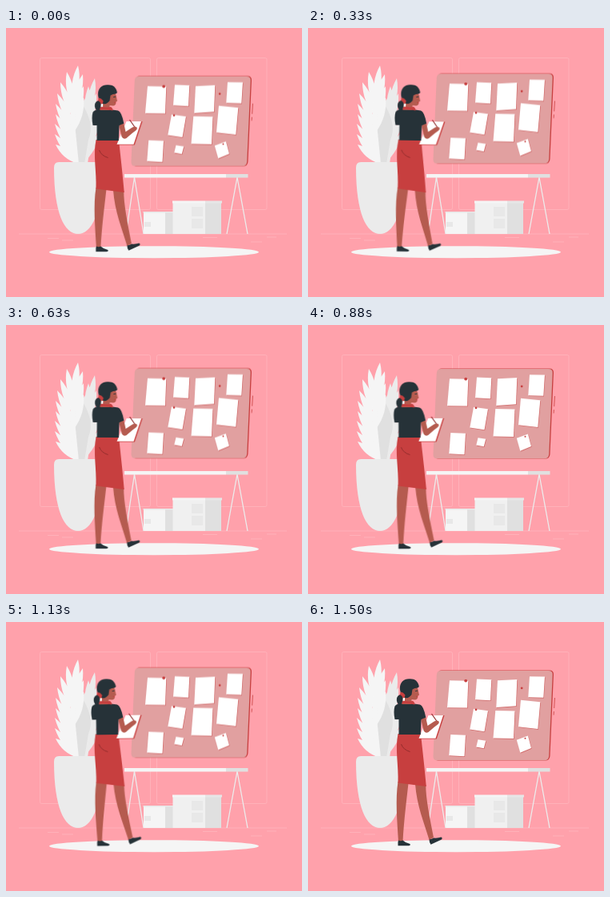
An HTML page that plays this animation: 370x337 px, repeating every 1540 ms.

```html
<!DOCTYPE html>
<html lang="en">
<head>
<meta charset="utf-8">
<title>Planning board</title>
<style>
  html, body { margin: 0; width: 100%; height: 100%; overflow: hidden; background: #ffa1ab; }
  svg { display: block; width: 370px; height: 337px; }
  .board { animation: float 1540ms linear -40ms infinite; }
  .person { transform-origin: 138.5px 176px; animation: sway 1540ms linear -40ms infinite; }
  @keyframes float { 50% { transform: translateY(-7.4px); } }
  @keyframes sway {
    0%, 100% { transform: rotate(0deg); }
    25% { transform: rotate(.9deg); }
    75% { transform: rotate(-.9deg); }
  }
  .line { fill: none; stroke: #ffb5bd; stroke-width: .8; }
  .red { fill: #c73f3f; }
  .ink { fill: #263238; }
  .skin { fill: #b55b4f; }
  .pale { fill: #f5f5f5; }
  .grey { fill: #e0e0e0; }
</style>
</head>
<body>
<svg viewBox="0 0 370 337">
  <g class="line">
    <rect x="42.500" y="37.500" width="138" height="190" rx="2"/>
    <rect x="188.500" y="37.500" width="137.500" height="190" rx="2"/>
    <path d="M16 258H351M52 263.500H66M70 266H84M246 262.500H264M306 268H320M326 262H338"/>
  </g>

  <ellipse class="pale" cx="185" cy="280.700" rx="131" ry="7.500"/>

  <g id="plant"></g>
  <path fill="#ebebeb" d="M66 168H114Q120.500 168 120.500 175C120 232 107 258 90 258S60 232 60 175Q60 168 66 168Z"/>

  <g class="storage">
    <path class="pale" d="M172 230H199V258H172Z"/>
    <path class="grey" d="M199 230H209V258H199Z"/>
    <path fill="#e8e8e8" d="M171.500 230H209V231.500H171.500ZM173 243H181V249H173Z"/>
    <path fill="#f0f0f0" d="M208.500 217H249V258H208.500Z"/>
    <path class="grey" d="M249 217H269V258H249Z"/>
    <path fill="#e8e8e8" d="M232 224H246V236H232ZM232 239H246V251H232Z"/>
    <path class="pale" d="M208 216.500H249V219.500H208Z"/>
    <path fill="#e6e6e6" d="M249 216.500H270V219.500H249Z"/>
  </g>
  <path d="M160.500 187L150 258M160.500 187L172 258M289 187L276 258M289 187L302 258" fill="none" stroke="#ececec" stroke-width="1.300"/>
  <path class="pale" d="M148 183H275V187.500H148Z"/>
  <path class="grey" d="M275 183H302.500V187.500H275Z"/>

  <g class="board">
    <path class="red" d="M167 60.500H302Q307.300 60.500 307 66L302.500 168Q302 173.500 296.500 173.500H163Q158 173.500 158.200 168L162 66Q162.300 60.500 167 60.500Z"/>
    <path fill="#e1a0a0" d="M166 60.900H300.500Q306 60.900 305.700 66L301.200 168Q300.800 173.300 295.500 173.300H161Q156.300 173.300 156.500 168L160.800 66Q161.200 60.900 166 60.900Z"/>
    <path d="M308.500 95L307.700 108M307.400 112L307.100 116.500" fill="none" stroke="#c73f3f" stroke-width=".8"/>
    <g id="papers"></g>
    <g class="red">
      <circle cx="197.200" cy="73.600" r="1.900"/>
      <circle cx="267.200" cy="82.800" r="1.400"/>
      <circle cx="210" cy="109.800" r="1.400"/>
      <circle cx="271.500" cy="145.800" r="1"/>
    </g>
  </g>

  <g class="person">
    <g class="skin">
      <path d="M134 203L147.300 204C147 220 152 244 157 270L151.500 273C145 251 136 230 134 203Z"/>
      <path d="M112.500 200L125.500 202C123 225 120 248 118.500 275H113C111.500 250 109 222 112.500 200Z"/>
    </g>
    <g class="ink">
      <path d="M113 273.500Q116 275 118.500 273.500Q122 277 127.500 278Q128.500 280 126 280.300H112.500Q112 276 113 273.500Z"/>
      <path d="M151.500 272.500Q155 272 157 270.500Q162 271 166.500 269.500Q168.500 270.500 167 272.500L153.500 278.700Q151.500 276 151.500 272.500Z"/>
    </g>
    <path class="red" d="M112.500 140H141C143 160 146 184 147.800 206L112.500 201.500C113.500 180 108.500 160 112.500 140Z"/>
    <path d="M116.500 153Q119 160 127.500 162.500" fill="none" stroke="#8f2b2b" stroke-width=".9"/>

    <path class="red" d="M151.500 117H170.500L160.800 146.500H139.500Z"/>
    <path fill="#fff" d="M150.500 117H169L159.500 145.800H138.500Z"/>
    <path d="M154.500 115L161.500 125" stroke="#8f2b2b" stroke-width="1.200"/>

    <path class="skin" d="M140.500 119L147 118.500L149.500 130L157 125Q160 122.500 163 124Q165 126 162 128.500L158 131.500L150.500 138Q146.500 140 144.500 136Z"/>
    <path class="ink" d="M115 102.500Q124 100 133 102.500L140 103.500Q144.500 105 147.300 119.500L141.500 122L140.800 141H113.500L113.500 122H108.500Q106.500 112 108.500 105.500Q110.500 102.500 115 102.500Z"/>
    <path class="skin" d="M119 86L131 80Q137.500 80 138 87L139 91.500L137.300 92.500Q137.500 97 134 97.500L129.500 97V103H117.500Z"/>
    <path class="red" d="M116 102.500Q118 98.500 121 98.500Q126 100.500 131 98.800Q133.500 100.500 133.500 103.500Q124 101 116 102.500Z"/>
    <path fill="#fff" d="M118.500 95H121V98.800H118.200Z"/>
    <path class="ink" d="M115.200 86C113.500 77 119 71.300 126 71.300C133 70.500 137.500 74 138.700 80Q139 82 137 82.500Q133 82.500 130.500 84.500L129.500 91Q126 96 121.500 95Q116 92 115.200 86Z"/>
    <path class="ink" d="M117.500 90.500Q110.500 91 110.800 98Q111.500 103.500 115.500 104.500Q118.500 101 118.500 95Z"/>
    <path class="red" d="M115.500 88Q118.500 87 121.500 91.500Q121.500 94.500 119 95.500Q117.500 92 115 91Z"/>
    <path class="ink" d="M134 86.300L137 85.600V86.500L134 87.100Z"/>
    <path class="red" d="M134.800 93.300L137.500 92.500L136.800 94.200Z"/>
  </g>
</svg>

<script>
  const add = (id, d, fill) => {
    const p = document.createElementNS('http://www.w3.org/2000/svg', 'path');
    p.setAttribute('d', d);
    p.setAttribute('fill', fill);
    document.getElementById(id).append(p);
  };

  // Pointed leaflet from the stem at (bx, by) to its tip
  const blade = (bx, by, x, y, w) => {
    const mx = (bx + x) / 2, my = (by + y) / 2;
    const len = Math.hypot(x - bx, y - by);
    const nx = (y - by) / len * w, ny = (bx - x) / len * w;
    return `M${bx} ${by}Q${mx + nx} ${my + ny} ${x} ${y}Q${mx - nx} ${my - ny} ${bx} ${by}Z`;
  };

  const frond = (tips, stemX, drop, w, fill) => {
    const d = tips.map(([x, y]) => {
      const by = Math.min(y + drop, 170);
      return blade(stemX(by), by, x, y, w);
    });
    add('plant', d.join(''), fill);
  };

  const leftStem = y => 84 + 6 * ((y - 100) / 70) ** 2;
  const rightStem = y => 104 - (y - 100) * .12;

  frond([[111, 63], [103, 73], [98, 88], [96, 103], [113, 82], [116, 98], [118, 114], [118, 130]],
    rightStem, 44, 8, '#ebebeb');
  add('plant', 'M104 92C111 115 106 145 102 170H90C94 145 96 115 104 92Z', '#ebebeb');
  add('plant', 'M97 98C107 116 108 128 103 140L98 170H86L80 136C82 122 91 118 97 98Z', '#e0e0e0');
  frond([[90, 47], [76, 55], [68, 68], [64, 82], [62, 95], [62, 108], [61, 120], [61, 133], [62, 146],
    [96, 58], [97, 73], [97, 87]], leftStem, 43, 8.5, '#f5f5f5');
  add('plant', 'M88 62C91 80 85 105 87 130L91 170H86C80 145 76 105 88 62Z', '#f5f5f5');

  const papers = [
    'M177 73.300L200.300 73.800L199 107.500L174 107.300Z',
    'M211 71.500L229.300 72.300L228 98.300L209 97.300Z',
    'M237 73.300L261.300 71.900L260 105.300L235.300 107Z',
    'M277 68.300L296 68.600L294.300 94.700L275.300 94.200Z',
    'M207 108.700L225 111.300L220.500 137.300L202.300 134.500Z',
    'M234.300 111L258.500 111.600L257 146L231.500 145.400Z',
    'M266 97.800L290.300 100.300L287.300 134L263 131.300Z',
    'M178.300 141L197 141.800L195.500 168.300L176.300 167.300Z',
    'M212.500 147.300L222.300 148.800L219.800 158.300L210.300 156.600Z',
    'M260.800 147.800L275 142.500L279 158L265.300 163.700Z'
  ];
  for (const d of papers) {
    add('papers', d, '#cf6464');
    document.getElementById('papers').lastChild.setAttribute('transform', 'translate(.6 .8)');
    add('papers', d, '#fff');
  }
</script>
</body>
</html>
```
